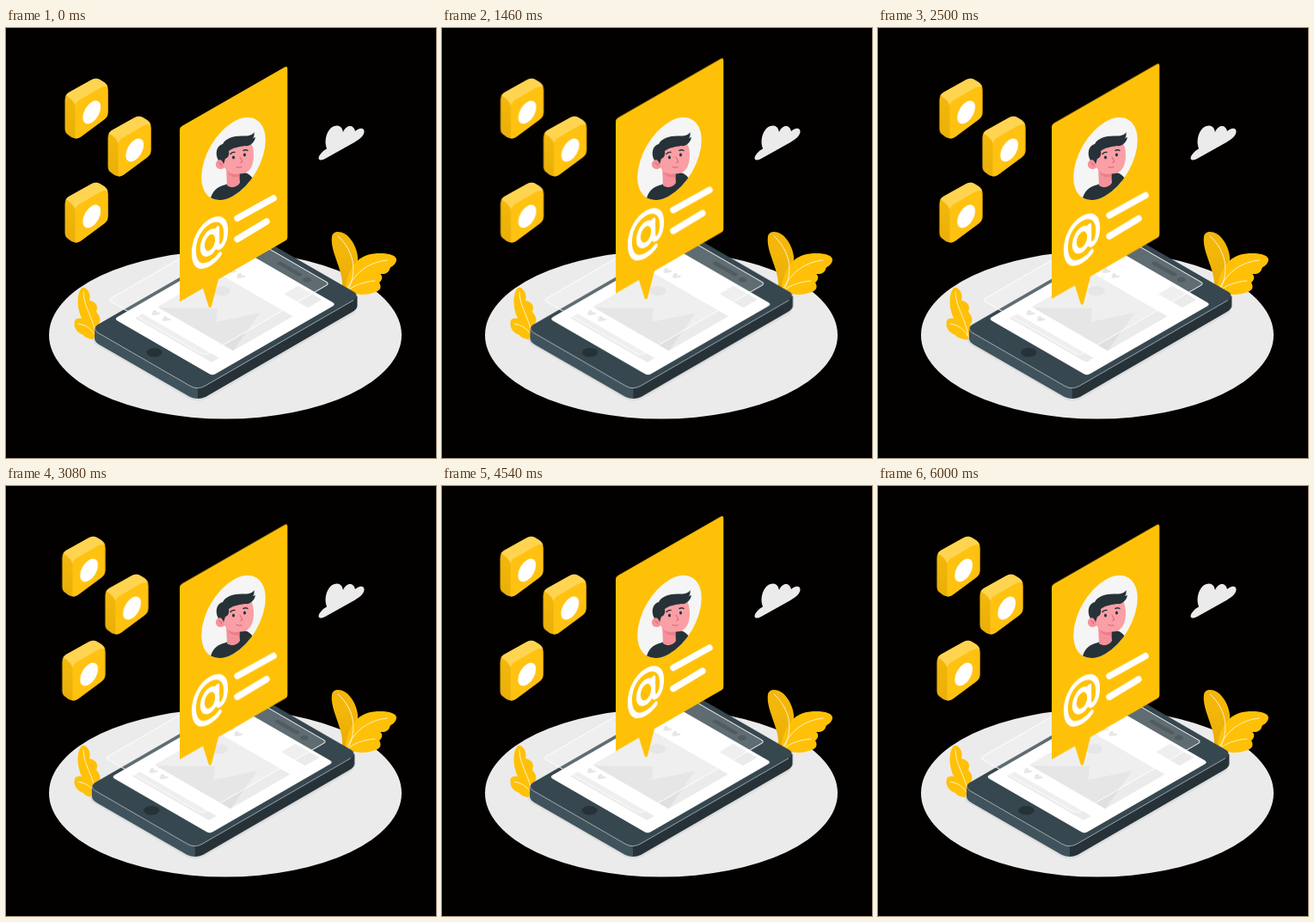
An HTML page that plays this animation: 500x500 px, repeating every 6.04 s.

```html
<!DOCTYPE html>
<html lang="en">
<head>
<meta charset="utf-8">
<title>Profile card</title>
<style>
  html, body { margin: 0; width: 100%; height: 100%; overflow: hidden; background: #030000; }
  svg { display: block; width: 100vw; height: 100vh; }
  .shake { animation: shake 6.04s linear infinite; }
  .float { animation: float 3.02s linear infinite; }
  @keyframes shake {
    0%, 100% { transform: translateX(0); }
    10%, 90% { transform: translateX(-1px); }
    20%, 80% { transform: translateX(2px); }
    30%, 50%, 70% { transform: translateX(-4px); }
    40%, 60% { transform: translateX(4px); }
  }
  @keyframes float {
    0%, 100% { transform: translateY(0); }
    50% { transform: translateY(-10px); }
  }
  .line { fill: none; stroke: #fff; stroke-linecap: round; stroke-linejoin: round; }
  .vein { fill: none; stroke: #fff; stroke-width: .9; stroke-linecap: round; opacity: .85; }
  .dark { fill: #263238; }
</style>
</head>
<body>
<svg viewBox="0 0 500 500">
  <defs>
    <linearGradient id="side" x1="0" y1="0" x2="0" y2="1">
      <stop offset="0" stop-color="#f8bc0c"/>
      <stop offset="1" stop-color="#eaaf08"/>
    </linearGradient>
    <linearGradient id="leaf" x1="0" y1="0" x2="0" y2="1">
      <stop offset=".3" stop-color="#f4b709"/>
      <stop offset="1" stop-color="#e6ab08"/>
    </linearGradient>
    <g id="tile">
      <path fill="url(#side)" d="M68.5 84Q68.5 78 73 75L99 60.5Q104 57.5 109 60L114 63Q118.5 66 118.5 71V98Q118.5 103.5 114 106.5L87 126.5Q82 130 76 127L72 124Q68.5 122 68.5 117Z"/>
      <path fill="#ffd451" d="M69.5 78.5Q71 76 73 75L99 60.5Q104 57.5 109 60L114 63Q117.5 65.5 118.2 69L110 72L86 86L80.5 90Q78 83 69.5 78.5Z"/>
      <path fill="#ffc210" d="M80.5 128.3V92Q80.5 87 85 84L110 69.5Q118.5 65 118.5 73V98Q118.5 103.5 114 106.5L87 126.5Q83.5 128.8 80.5 128.3Z"/>
      <circle r="12" fill="#fff" transform="matrix(.866 -.5 0 1 99.7 98)"/>
    </g>
    <path id="heart" d="M0 -3C-5 2 -5 5 -2.5 5Q-1 5 0 3Q1 5 2.5 5C5 5 5 2 0 -3Z"/>
    <clipPath id="round"><circle r="43" transform="matrix(.866 -.5 0 1 264.5 152)"/></clipPath>
  </defs>

  <ellipse cx="255" cy="357" rx="205" ry="97.5" fill="#ebebeb"/>
  <path fill="#ebebeb" d="M365 153.5C362 152 364 148 368 144C371 141 373 141 373 140C369 130 374 116 382 114C387 112 391 115 392 121C396 112 404 112 406 120C410 116 417 115 416.5 121C416 126 410 130 405 133L371 152Q367 154 365 153.5Z"/>

  <!-- plants -->
  <g fill="#ffc107">
    <path fill="url(#leaf)" d="M390 308C396 285 376 262 379 242C381 234 394 236 401 246C408 255 411 268 408 277C404 290 400 298 397 306Z"/>
    <path d="M394 306C397 285 403 270 420 264C434 260 455 262 454 270C453 277 446 277 446 281C443 287 438 286 432 286C420 287 405 295 397 306Z"/>
    <path d="M392 306C404 294 414 284 428 283C436 284 441 290 434 296C438 302 434 307 426 308C416 312 402 309 392 306Z"/>
    <path d="M104 361C101 350 87 342 85 329C82 317 84 303 90 301.5C96 303 99 311 97 317C104 318 108 323 105 330C110 336 111 341 107 345C112 350 112 355 107 361Z"/>
    <path d="M106 363C98 362 91 360 90 357C82 354 78 348 80 340C83 335 93 338 98 343C104 349 106 356 106 363Z"/>
  </g>
  <path class="vein" d="M386 242C399 254 411 275 399 302M443 270C424 272 407 282 397 303M429 294C416 295 405 299 398 305M90 307C90 324 102 338 105 358M84 344C93 345 100 350 105 359"/>

  <g class="shake">
    <use href="#tile"/>
    <use href="#tile" x="50" y="44"/>
    <use href="#tile" y="121"/>

    <!-- phone -->
    <rect x="-2" width="148" height="219" rx="12" fill="#dedede" transform="matrix(.866 .5 .866 -.5 97 364)"/>
    <path fill="#40535c" d="M103 349V361Q103 365 109 368.5L214 429Q218.5 431 223 431V414L109 346Z"/>
    <path class="dark" d="M223 431Q227.5 431 232 429L403 330Q408.5 326.5 408.5 323V312L400 309L223 411Z"/>
    <g transform="matrix(.866 .5 .866 -.5 98 349.2)">
      <rect x=".8" width="143.2" height="219.4" rx="10" fill="#37474f"/>
      <path class="line" stroke-width=".8" opacity=".6" d="M3 3Q6 0 10 0H134Q144 0 144 10V209"/>
      <rect x="5" y="27" width="132" height="166" rx="4" fill="#fff"/>
      <circle class="dark" cx="71" cy="15" r="7.5"/>
      <path stroke="#263238" stroke-width="5" stroke-linecap="round" d="M52 203H78"/>
      <circle class="dark" cx="89" cy="202" r="4"/>
      <rect x="18" y="42" width="103" height="10" fill="#ebebeb"/>
      <rect x="20" y="70" width="102" height="80" fill="#ebebeb"/>
      <path fill="#e0e0e0" d="M22 70L62 109L77 92L96 132L122 70Z"/>
      <circle cx="45" cy="132" r="8" fill="#e0e0e0"/>
      <rect x="90" y="170" width="32" height="19" fill="#ebebeb"/>
      <g fill="#e0e0e0">
        <use href="#heart" x="26" y="60"/>
        <use href="#heart" x="40" y="60"/>
        <use href="#heart" x="28" y="160"/>
        <use href="#heart" x="40" y="160"/>
      </g>
      <rect x="-21" y="45" width="129.5" height="167.5" rx="4" fill="#fff" fill-opacity=".2" stroke="#fff" stroke-width="1"/>
    </g>
  </g>

  <!-- card -->
  <g class="float">
    <path fill="#ffc107" d="M202 118.5Q202 115.5 205 113.8L324 45.6Q327.3 44 327.3 47V243.5Q327.3 246 325 247.3L247 292.3L239 323.5Q237.3 327 235.5 323.5L229 302.8L202 318.3Z"/>
    <path class="line" stroke-width="7.5" d="M269 221.3L311 198M269 245.5L303 225"/>
    <g class="line" stroke-width="5.8" transform="matrix(.866 -.5 0 1 237 249.5)">
      <ellipse rx="10" ry="12"/>
      <path d="M10 -11V6C10 16 21.5 14 21.5 -2C21.5 -16 12 -24.5 0 -24.5C-13 -24.5 -21.5 -14 -21.5 0C-21.5 15 -13 24.5 0 24.5C6 24.5 10 23 13 20.5"/>
    </g>
  </g>

  <!-- portrait -->
  <circle r="43" fill="#f5f5f5" transform="matrix(.866 -.5 0 1 264.5 152)"/>
  <g clip-path="url(#round)">
    <path class="dark" d="M237 203C239 189 245 185 256 182L271 168C280 167 285 171 289 178L282 203Z"/>
    <path fill="#f5919a" d="M256 162L257 183C262 187 269 185 272 180L271 164Z"/>
    <path fill="#e97d88" d="M257.5 168C264 171 268 171 271.5 169L271.7 173C265 174.5 261 172.5 257.5 168Z"/>
    <circle cx="249.5" cy="158.5" r="5.6" fill="#f5919a"/>
    <path fill="#f99fa5" d="M252 145Q256 137 266 134L284 132C288 138 289 148 287 157C285 165 280 169.5 272 169.5C262 170 256 167 253 160Z"/>
    <path class="dark" d="M247 154C242 145 246 136 252 135C255 128 266 125 276 125.5C281 126 286 125 288.5 121C289 125 288 127 287 128L290 127C289 133 284 138 278 137C272 138 264 139 259 143C260 148 258 151 255 152L253 158.5C252 154 249 152 247 154Z"/>
    <ellipse class="dark" cx="264.5" cy="150.5" rx="1.5" ry="2"/>
    <ellipse class="dark" cx="277.5" cy="147.5" rx="1.5" ry="2"/>
    <path fill="none" stroke="#263238" stroke-width="1.4" stroke-linecap="round" d="M261 146.5Q263 144 266 144.5M276 142.5Q279 141 281 142.5"/>
    <path fill="none" stroke="#d9616c" stroke-width="1" stroke-linecap="round" d="M272 150L275 155.5L272.5 156.5M268 161.5Q271 163 274 162M248 157Q250 157 251 160"/>
  </g>
</svg>
</body>
</html>
```
